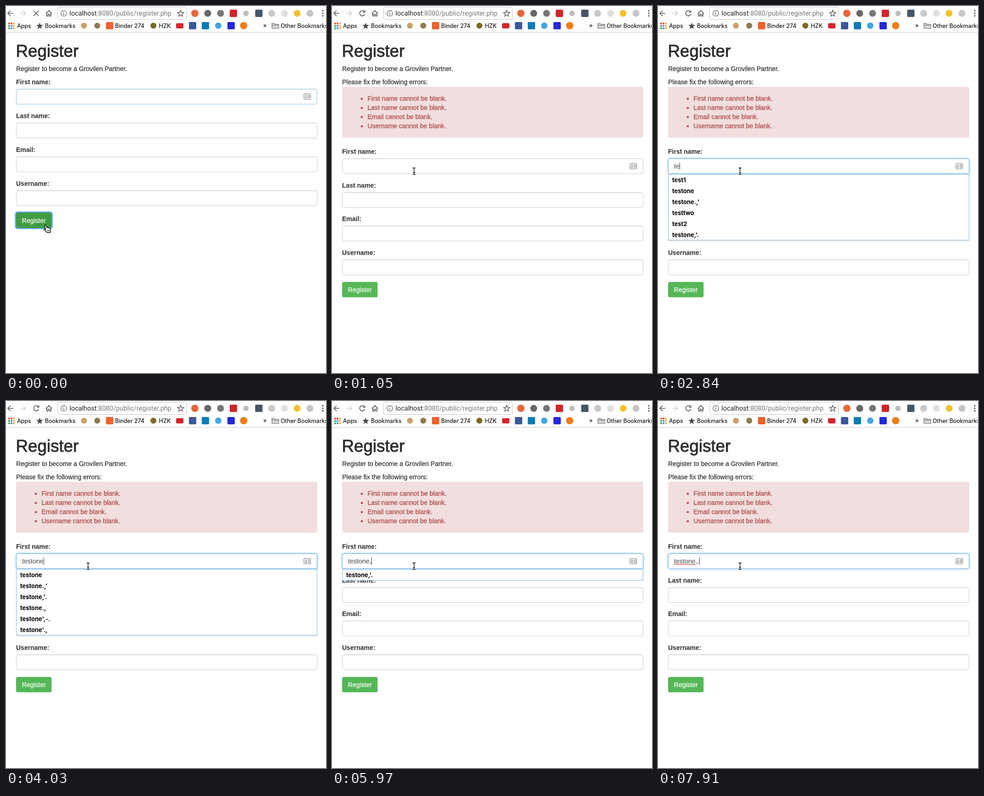
Recreate the animation shown at these times as an HTML page. Size 698 px wide and 802 px high, loop 8 s.

```html
<!DOCTYPE html>
<html lang="en">
<head>
<meta charset="utf-8">
<title>Register form</title>
<style>
  html, body { margin: 0; width: 100%; height: 100%; overflow: hidden; background: #fff; }
  svg { display: block; width: 698px; height: 802px; }
  text {
    --ink: #2e2e2e;
    font: 14px "Liberation Sans", Arial, sans-serif;
    fill: var(--ink); stroke: var(--ink); stroke-width: .25; white-space: pre;
  }
  .bar { --ink: #1c1c1c; font: 500 12.4px Inter, sans-serif; stroke-width: 0; }
  .url { --ink: #777; font: 14.5px Roboto, sans-serif; stroke-width: 0; }
  .url tspan { fill: #222; }
  .title { font-size: 36.8px; stroke-width: .9; }
  .label { font-weight: bold; stroke-width: 0; }
  .error { --ink: #a94442; }
  .typed { --ink: #555; font-size: 14.25px; stroke-width: .1; }
  .option { --ink: #000; font: 700 12.9px Inter, sans-serif; stroke-width: 0; }
  .white { --ink: #fff; }
  .line { fill: none; stroke: #5a5a5a; stroke-width: 1.7; }
</style>
</head>
<body>
<svg viewBox="0 0 698 802">
  <g id="chrome"></g>
  <g id="page"></g>
</svg>
<script>
const LOOP = 8000;
const FIELDS = ['First name', 'Last name', 'Email', 'Username'];
const ANY_TEST = ['test1', 'testone', "testone.,'", 'testtwo', 'test2', "testone,'."];
const ONLY_ONE = ['testone', "testone.,'", "testone,'.", 'testone.,', "testone',-.", "testone'.,"];

// Each step lists only what changes at that time (ms).
const STEPS = [
  [0, { loading: true, errors: false, border: '#8fc0e3', glow: 0, typed: '', caret: false,
        options: [], misspelt: false, cursor: 'hand', x: 89, y: 487 }],
  [300, { loading: false, errors: true, border: '#ccc' }],
  [450, { cursor: 'beam', x: 117, y: 449 }],
  [600, { x: 158, y: 389 }],
  [750, { x: 177, y: 364 }],
  [1050, { x: 179, y: 361 }],
  [1200, { border: '#8fbfe6', glow: .35, caret: true }],
  [1340, { border: '#66afe9', glow: .75 }],
  [1790, { caret: false }],
  [2240, { caret: true }],
  [2690, { typed: 't', options: ANY_TEST }],
  [2840, { typed: 'te' }],
  [3140, { typed: 'tes' }],
  [3290, { typed: 'test' }],
  [3740, { typed: 'testo', options: ONLY_ONE }],
  [3890, { typed: 'teston' }],
  [4030, { typed: 'testone' }],
  [4480, { caret: false }],
  [4930, { caret: true }],
  [5530, { caret: false }],
  [5970, { typed: 'testone,', caret: true, options: ["testone,'."] }],
  [6120, { misspelt: true }],
  [6570, { caret: false }],
  [7020, { caret: true }],
  [7470, { caret: false }],
  [7910, { typed: 'testone,.', caret: true, options: [] }],
];

const $ = id => document.getElementById(id);
const text = (x, y, s, cls = '') => `<text x="${x}" y="${y}" class="${cls}">${s}</text>`;
const rect = (x, y, w, h, fill, more = '') =>
  `<rect x="${x}" y="${y}" width="${w}" height="${h}" fill="${fill}" ${more}/>`;
const dot = (x, y, r, fill, more = '') => `<circle cx="${x}" cy="${y}" r="${r}" fill="${fill}" ${more}/>`;
const path = (d, more = 'class="line"') => `<path d="${d}" ${more}/>`;
const tile = (x, y, fill) => rect(x - 8, y - 8, 16, 16, fill, 'rx="2"');

function star(cx, cy, radius, more) {
  const points = Array.from({ length: 10 }, (_, i) => {
    const r = i % 2 ? radius * .42 : radius, a = Math.PI * (i / 5 - .5);
    return `${cx + r * Math.cos(a)},${cy + r * Math.sin(a)}`;
  });
  return `<polygon points="${points.join(' ')}" ${more}/>`;
}

function browserBars() {
  const apps = ['#e34234', '#e34234', '#f0a52c', '#3d9b55', '#4285f4', '#f0a52c', '#3d9b55', '#4285f4', '#f0a52c'];
  return path('M16 16H4M10 10L4 16L10 22')
    + path('M31 16H43M37 10L43 16L37 22', 'class="line" style="stroke:#d0d0d0"')
    + path('M87 16.5L93.5 10L100 16.5M89 15V22H92V18H95V22H98V15')
    + rect(112.5, 2.5, 281, 27, '#fff', 'rx="3" stroke="#c6c6c6"')
    + dot(126, 16, 6.2, 'none', 'stroke="#666" stroke-width="1.3"')
    + path('M126 15V19.5M126 12.3V13.8', 'stroke="#666" stroke-width="1.5"')
    + text(138.5, 21, '<tspan>localhost</tspan>:8080/public/register.php', 'url')
    + star(381, 16.5, 7.3, 'fill="none" stroke="#555" stroke-width="1.3"')
    + dot(412, 16, 8, '#e5683c') + dot(440, 16, 7.5, '#666') + dot(468, 16, 7.5, '#777')
    + tile(496, 16, '#d3242a') + dot(523.5, 16, 6, '#bdbdbd') + tile(551.5, 16, '#465669')
    + dot(579.5, 16, 7.5, '#c8c8c8') + dot(607.5, 16, 7.5, '#e0e0e0')
    + dot(635, 16, 7.5, '#f2c230') + dot(663, 16, 7.5, '#c6c6c6')
    + [10.5, 16, 21.5].map(y => dot(691, y, 1.7, '#5a5a5a')).join('')
    + apps.map((c, i) => rect(5 + i % 3 * 5.2, 36.5 + (i / 3 | 0) * 5.2, 3.6, 3.6, c)).join('')
    + text(24, 48, 'Apps', 'bar')
    + star(73.5, 44, 7.8, 'fill="#4a4a4a"') + text(85, 48, 'Bookmarks', 'bar')
    + dot(170, 43, 6.5, '#c9a26b') + dot(199, 43, 6.5, '#8f7a4c')
    + tile(226, 43, '#f0622d') + text(238, 48, 'Binder 274', 'bar')
    + dot(321.5, 43, 6.5, '#7a6a22') + text(333.5, 48, 'HZK', 'bar')
    + rect(371, 37.5, 16, 11.5, '#d8232a', 'rx="2.5"') + tile(407, 43, '#3b5998') + tile(435, 43, '#0c7bb8')
    + dot(463, 43, 7, '#45a5e6') + tile(491, 43, '#2429d8') + dot(518.5, 43, 8, '#f07d1a')
    + text(561, 47, '»', 'bar')
    + path('M580 49V38H585L587 40H595V49ZM580 42H595', 'fill="#d6d6d6" stroke="#666" stroke-width="1.1"')
    + text(599, 48, 'Other Bookmarks', 'bar')
    + rect(0, 57, 698, 1, '#c9c9c9');
}

const reloadButton = loading => path(loading
  ? 'M60.5 10.5L71.5 21.5M71.5 10.5L60.5 21.5'
  : 'M70.5 12.2A5.7 5.7 0 1 0 71.6 17.5M71.6 9.5V14H67');

const contactCard = y => rect(649.8, y - 5.7, 14.6, 11.4, '#fff', 'rx="1.5" stroke="#a0a0a0" stroke-width="1.6"')
  + dot(654.3, y - 1.8, 1.7, '#a0a0a0') + rect(651.8, y + .6, 5, 2.6, '#a0a0a0', 'rx="1"')
  + [-3.4, -.8, 1.8].map(dy => rect(658, y + dy, 5, 1.6, '#a0a0a0')).join('');

const errorBox = () => text(22, 171, 'Please fix the following errors:')
  + rect(22, 176.5, 657, 111.5, '#f2dede', 'rx="4"')
  + FIELDS.map((name, i) => dot(65, 202.7 + 20 * i, 2.3, '#a94442')
    + text(77.5, 207 + 20 * i, `${name} cannot be blank.`, 'error')).join('');

function field(name, y, border, glow) {
  const shadow = glow ? `style="filter:drop-shadow(0 0 2.5px rgba(102,175,233,${glow}))"` : '';
  return text(22, y - 10, name + ':', 'label')
    + rect(22.5, y + .5, 656, 33, '#fff', `rx="3.5" stroke="${border}" ${shadow}`)
    + rect(25, y + 1, 651, 1, '#000', 'opacity=".05"');
}

function submitButton(y, pressed) {
  const ring = rect(21.5, y - .5, 78.5, 34.5, 'none',
    'rx="4" stroke="#5aa4e6" stroke-width="3" style="filter:drop-shadow(0 0 1.5px #7fbaf0)"');
  return (pressed ? ring : '')
    + rect(22, y, 77.4, 33.5, pressed ? '#419d42' : '#55b757', 'rx="3.5"')
    + text(34.8, y + 22, 'Register', 'white');
}

const dropdown = options => !options.length ? '' :
  rect(22.5, 367.5, 656, .6 + 23.9 * options.length, '#fff', 'stroke="#7fb5e3"')
  + options.map((s, i) => text(31, 385 + 23.9 * i, s, 'option')).join('');

function pointer({ cursor, x, y }) {
  if (cursor === 'hand') return `<g transform="translate(${x - 7} ${y - 9})" stroke="#000" stroke-linejoin="round">`
    + path('M3 1.5C4-.2 5.6.3 6 2L7.3 6.5L8.5 6.2C9.5 5.6 10 6.5 10.5 7C11.5 6.4 12.4 7 12.8 8C14 7.6 14.6 8.6 14.8 9.6L15.3 13L14.5 17H7.5L4 13.5L.8 11C.4 9.6 1.6 9 3 9.8L4.6 11Z', 'fill="#fff" stroke-width="1.3"')
    + path('M8.3 11V14.5M10.4 11V14.5M12.5 11V14.5', 'stroke-width=".9"') + '</g>';
  const beam = `M${x - 3} ${y - 7.5}Q${x} ${y - 7.5} ${x} ${y - 5}Q${x} ${y - 7.5} ${x + 3} ${y - 7.5}`
    + `M${x} ${y - 5}V${y + 5}M${x - 2} ${y + 3}H${x + 2}`
    + `M${x - 3} ${y + 7.5}Q${x} ${y + 7.5} ${x} ${y + 5}Q${x} ${y + 7.5} ${x + 3} ${y + 7.5}`;
  return path(beam, 'fill="none" stroke="#fff" stroke-width="3"')
    + path(beam, 'fill="none" stroke="#111" stroke-width="1.3"');
}

const measure = document.createElement('canvas').getContext('2d');
measure.font = '14.25px "Liberation Sans", Arial, sans-serif';
const caretX = s => 35 + Math.round(measure.measureText(s).width);

function page(s) {
  const top = s.errors ? 333 : 181.4;
  const rowY = i => Math.round(top + 73.7 * i);
  return reloadButton(s.loading)
    + text(21.5, 111, 'Register', 'title')
    + text(22, 141.5, 'Register to become a Grovilen Partner.')
    + (s.errors ? errorBox() : '')
    + FIELDS.map((name, i) => field(name, rowY(i), i ? '#ccc' : s.border, i ? 0 : s.glow)).join('')
    + contactCard(rowY(0) + 17)
    + submitButton(s.errors ? 603 : 451.5, s.loading)
    + text(35, 355, s.typed, 'typed')
    + (s.misspelt ? path(`M35 357H${caretX('testone')}`, 'stroke="#e0413a" stroke-width="1.8" stroke-dasharray="2 1.2"') : '')
    + (s.caret ? rect(caretX(s.typed), 342, 1, 16, '#333') : '')
    + dropdown(s.options)
    + pointer(s);
}

$('chrome').innerHTML = browserBars();
let shown = 0;
function draw(now) {
  const reached = STEPS.filter(([start]) => start <= now % LOOP);
  if (reached.length !== shown) {
    shown = reached.length;
    $('page').innerHTML = page(Object.assign({}, ...reached.map(([, change]) => change)));
  }
  requestAnimationFrame(draw);
}
draw(0);
</script>
</body>
</html>
```
